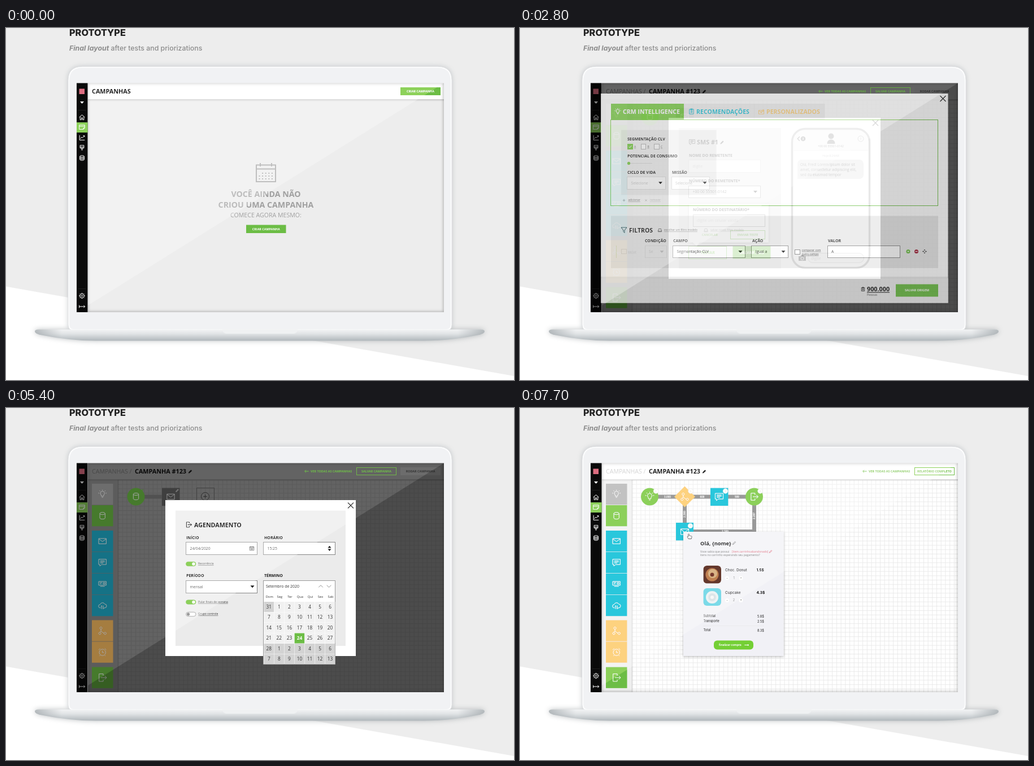
Recreate the animation shown at these times as an HTML page. Size 899 px wide and 623 px high, loop 8000 ms.

```html
<!DOCTYPE html>
<html lang="pt">
<head>
<meta charset="utf-8">
<title>Prototype</title>
<style>
  html, body { margin: 0; width: 100%; height: 100%; overflow: hidden; background: #ededed; }
  svg { display: block; width: 899px; height: 623px; font-family: "Open Sans", "Noto Sans", sans-serif; }
  .head { font-family: Inter, sans-serif; }
  .b { font-weight: 700; }
  .m { text-anchor: middle; }
  .u { text-decoration: underline; }
  .shine { mix-blend-mode: overlay; }
</style>
</head>
<body>
<svg id="stage" viewBox="0 0 899 623" xmlns="http://www.w3.org/2000/svg"></svg>
<script>
const GREEN = '#6cbd45', CYAN = '#1fb0cd', YELLOW = '#fdbf62', GREY = '#a8a8a8';
const PHONE = '+00 00 55501-0142';

const gearTeeth = Array.from({ length: 8 }, (_, i) => {
  const c = Math.cos(i * Math.PI / 4), s = Math.sin(i * Math.PI / 4);
  return `M${12 + 8 * c} ${12 + 8 * s}L${12 + 11 * c} ${12 + 11 * s}`;
}).join('');

// Line icons on a 24 x 24 grid
const ICONS = {
  home: 'M2 12 12 3 22 12M5 10V21H10V14H14V21H19V10',
  plan: 'M2 4H22V15L17 20H2ZM2 9H22M17 20V15H22',
  chart: 'M3 3V21H22M6 16 11 10 14 13 21 5M16 5H21V10',
  brush: 'M5 3H19V13H5ZM5 9H19M10 13V19Q12 24 14 19V13',
  db: 'M5 6Q5 3 12 3T19 6V18Q19 21 12 21T5 18ZM5 6Q5 9 12 9T19 6',
  stack: 'M4 6Q4 3 12 3T20 6V18Q20 21 12 21T4 18ZM4 6Q4 9 12 9T20 6M4 10Q4 13 12 13T20 10M4 14Q4 17 12 17T20 14',
  gear: 'M12 4a8 8 0 1 0 .01 0ZM12 9a3 3 0 1 0 .01 0Z' + gearTeeth,
  out: 'M2 7V17M2 12H23M18 8 23 12 18 16',
  bulb: 'M9 17H15M10 20H14M9 17Q9 14 7.5 12.5A5.5 5.5 0 1 1 16.5 12.5Q15 14 15 17M12 0V2M1 9H3.5M20.5 9H23M4 2 6 4M20 2 18 4',
  mail: 'M2 5H22V19H2ZM2 6 12 13 22 6',
  chat: 'M2 3H22V17H10L5 21V17H2ZM6 7H18M6 10H18M6 13H14',
  push: 'M2 5H22V15H2ZM5 8H11M5 11H9M14 8H19V12H14ZM6 18H18',
  cloud: 'M8 18H6A4.5 4.5 0 0 1 6 9A6.5 6.5 0 0 1 18 8A5 5 0 0 1 18 18H16M10 21V12L7.5 14.5M14 12V21L16.5 18.5',
  branch: 'M8 2a3 3 0 1 0 .01 0ZM5 16a3 3 0 1 0 .01 0ZM19 16a3 3 0 1 0 .01 0ZM8 8V13L5 16M8 13 16 19',
  alarm: 'M12 4a8.5 8.5 0 1 0 .01 0ZM12 8V13H16M2 6 6 2M22 6 18 2M6 20 4 22M18 20 20 22',
  exit: 'M14 7V2H3V22H14V17M8 12H23M18 7 23 12 18 17',
  pencil: 'M3 21 5 15 17 3 21 7 9 19Z',
  cal: 'M2 4H22V21H2ZM2 9H22M7 2V6M17 2V6M6 13H18M6 17H18',
  funnel: 'M2 3H22L14 13V22L10 18V13Z',
  tray: 'M3 15 6 4H18L21 15V20H3ZM3 15H8L10 17H14L16 15H21',
  list: 'M4 3H20V21H4ZM8 7H16M8 11H16M8 15H16M9 1H15V4H9Z',
  back: 'M23 12H2M9 5 2 12 9 19',
  arrow: 'M1 12H23M18 8 23 12 18 16',
  close: 'M2 2 22 22M22 2 2 22',
  plus: 'M12 3V21M3 12H21',
  check: 'M4 12 10 18 20 6',
  up: 'M2 17 12 7 22 17',
  down: 'M2 7 12 17 22 7',
  left: 'M17 2 7 12 17 22',
  move: 'M12 2V9M12 15V22M2 12H9M15 12H22M9 5 12 2 15 5M9 19 12 22 15 19M5 9 2 12 5 15M19 9 22 12 19 15',
  hand: 'M8 22 3 14Q4 11 7 14V4Q9 1 10.5 4V10Q13 8 14 10.5 17 9 18 11.5 21 10.5 21 14L19 22Z'
};

const icon = (name, cx, cy, size, color = '#fff', weight = 1, fill = 'none') =>
  `<path d="${ICONS[name]}" transform="translate(${cx - size / 2} ${cy - size / 2}) scale(${size / 24})" fill="${fill}" stroke="${color}" stroke-width="${weight * 24 / size}"/>`;
const rect = (x, y, x2, y2, fill, extra = '') =>
  `<rect x="${x}" y="${y}" width="${x2 - x}" height="${y2 - y}" fill="${fill}" ${extra}/>`;
// Outlined box, snapped to whole pixels
const frame = (x, y, x2, y2, stroke, fill = 'none', extra = '') =>
  rect(Math.floor(x) + .5, Math.floor(y) + .5, Math.ceil(x2) - .5, Math.ceil(y2) - .5, fill, `stroke="${stroke}" ${extra}`);
const disc = (cx, cy, r, fill, extra = '') => `<circle cx="${cx}" cy="${cy}" r="${r}" fill="${fill}" ${extra}/>`;
const path = (d, fill, extra = '') => `<path d="${d}" fill="${fill}" ${extra}/>`;
// y is the middle of the capitals
const text = (x, y, str, size = 7, fill = '#222', cls = '', extra = '') =>
  `<text x="${x}" y="${y + size * .357}" font-size="${size}" fill="${fill}" class="${cls}" ${extra}>${str}</text>`;
const label = (x, y, str) => text(x, y, str, 7, '#1c1c1c', 'b');
const caret = (x, y, color = '#111') => path(`M${x - 3.5} ${y - 2}h7l-3.5 4z`, color);
const button = (x, y, x2, y2, str, size = 5.4) =>
  rect(x, y, x2, y2, GREEN) + text((x + x2) / 2, (y + y2) / 2, str, size, '#fff', 'b m');
const outline = (x, y, x2, y2, str, size = 5.4) =>
  frame(x, y, x2, y2, GREEN) + text((x + x2) / 2, (y + y2) / 2, str, size, GREEN, 'b m');
const field = (x, y, x2, y2, str, { faint, select, line = faint ? '#cfcfcf' : '#858585', bg = '#fff' } = {}) =>
  frame(x, y, x2, y2, line, bg) + text(x + 7, (y + y2) / 2, str, 6.8, faint ? '#b4b4b4' : '#333') +
  (select ? caret(x2 - 9, (y + y2) / 2, select) : '');
const dimmed = (level, body) => `<g style="filter:brightness(${level})">${body}</g>`;

function sidebar(level) {
  const entries = [['home', 158], ['plan', 175.5], ['chart', 194], ['brush', 212], ['stack', 230], ['gear', 474], ['out', 493]];
  return dimmed(level, rect(125, 97.5, 144.5, 503, '#0a0a0a') + rect(125, 167, 144.5, 185, '#8bd05a') +
    rect(129.5, 107.5, 139, 117, '#dc6d80') + caret(134.5, 132, '#fff') +
    rect(128, 145, 141, 145.5, '#333') + rect(128, 461, 141, 461.5, '#333') +
    entries.map(([name, y]) => icon(name, 134.5, y, 11.5)).join(''));
}

const edges = `<g clip-path="url(#work)"><rect x="143" y="96" width="633" height="408" fill="none" stroke="#000" stroke-opacity=".3" stroke-width="4" filter="url(#soft)"/></g>`;
const headerBar = rect(145, 98, 775, 130, 'url(#drop)') + rect(145, 97.5, 775, 126, '#fff');

function emptyScene() {
  let dots = '';
  for (let n = 1; n < 15; n++) {
    const x = 447.5 + n % 5 * 5.6, y = 256 + Math.floor(n / 5) * 5;
    dots += rect(x, y, x + 2, y + 2, '#a3a3a3');
  }
  return rect(145, 98, 775, 503, '#ededed') + headerBar + edges +
    text(152, 112.5, 'CAMPANHAS', 10.8, '#111', 'b') + button(698, 105, 769, 119, 'CRIAR CAMPANHA') +
    path('M443 242.5H477V272H443ZM443 249.5H477M450 239V245M470 239V245', 'none', 'stroke="#a3a3a3" stroke-width="2"') + dots +
    text(460, 294, 'VOCÊ AINDA NÃO', 14.2, '#a0a0a0', 'b m') +
    text(460, 312.5, 'CRIOU UMA CAMPANHA', 14.2, '#a0a0a0', 'b m') +
    text(460, 331.5, 'COMECE AGORA MESMO:', 10.6, '#a0a0a0', 'm') +
    button(425, 348.5, 495.5, 363, 'CRIAR CAMPANHA') + sidebar(1);
}

const TILES = [
  ['bulb', 134, GREY], ['db', 172, GREEN], ['mail', 217, CYAN], ['chat', 255, CYAN], ['push', 293, CYAN],
  ['cloud', 331, CYAN], ['branch', 375.5, YELLOW], ['alarm', 413.5, YELLOW], ['exit', 458.5, GREEN]
];

function board({ level = 1, body = '' }) {
  const dark = level < 1;
  const shift = dark ? -78 : 0;
  const tiles = TILES.map(([name, y, color]) =>
    rect(152, y, 189.5, y + 37.3, color) + icon(name, 170.7, y + 18.7, 16)).join('');
  const actions = icon('back', 610 + shift, 112, 8, GREEN) +
    text(617 + shift, 112, 'VER TODAS AS CAMPANHAS', 5.4, GREEN, 'b') +
    (dark ? outline(620, 105, 691, 119, 'SALVAR CAMPANHA') +
        rect(698, 105, 769, 119, '#686868') + text(733.5, 112, 'RODAR CAMPANHA', 5.4, '#333', 'b m')
      : outline(698, 105, 769, 119, 'RELATÓRIO COMPLETO'));
  return rect(145, 98, 775, 503, '#fff') + rect(198, 127, 775, 503, 'url(#grid)') +
    rect(145, 127, 197, 503, '#efefef') + rect(197, 127, 201, 503, 'url(#side)') + headerBar + edges +
    (dark ? rect(145, 97.5, 775, 503, '#000', 'opacity=".7"') : '') +
    dimmed(dark ? level + .3 : 1, actions) +
    dimmed(level, tiles + text(152, 112.5, 'CAMPANHAS /', 10.6, dark ? '#707070' : '#c4c4c4') +
      text(228, 112.5, 'CAMPANHA #123', 10.8, '#0c0c0c', 'b') + icon('pencil', 326, 112.5, 7, '#111', 1, '#111') + body) +
    sidebar(dark ? level + .1 : 1);
}

function segmentScene() {
  const box = (x, y, color = '#999', fill = '#fff') => frame(x, y, x + 9, y + 9, color, fill);
  const segments = ['A', 'B', 'C'].map((name, i) =>
    box(190.5 + 23.5 * i, 205.5, i ? '#999' : GREEN, i ? '#fff' : GREEN) + text(202 + 23.5 * i, 210, name, 5, '#444', 'u')).join('');
  return board({ level: .4 }) + rect(143, 116, 757.5, 486.5, '#fff') + icon('close', 748.5, 125, 12, '#222', 1.2) +
    rect(161, 134, 290, 163, GREEN) + rect(290, 134, 539.5, 163, '#ededed') + rect(414, 134, 414.5, 163, '#ddd') +
    icon('bulb', 173, 148, 12) + text(182, 148.5, 'CRM INTELLIGENCE', 10.6, '#fff', 'b') +
    icon('list', 303.5, 148, 11, CYAN) + text(312, 148.5, 'RECOMENDAÇÕES', 10.6, CYAN, 'b') +
    icon('mail', 427, 149, 11, YELLOW) + icon('pencil', 429, 147, 8, YELLOW) + text(436, 148.5, 'PERSONALIZADOS', 10.6, YELLOW, 'b') +
    frame(160.5, 162.5, 740, 314.5, GREEN, '#fff') + rect(179, 180.5, 347.5, 295.5, '#ededed') +
    label(190, 197, 'SEGMENTAÇÃO CLV') + segments + icon('check', 195, 210, 7) +
    label(190, 226.5, 'POTENCIAL DE CONSUMO') + rect(193, 239, 234, 239.7, '#bbb') + disc(192.5, 239.5, 2.7, GREEN) +
    label(190, 255.5, 'CICLO DE VIDA') + label(269, 255.5, 'MISSÃO') +
    field(189.5, 263, 257.5, 285.5, 'Selecione', { faint: true, select: '#111' }) +
    field(268, 263, 336, 285.5, 'Selecione', { faint: true, select: '#111' }) +
    icon('plus', 184, 305, 6, '#777', .8) + text(191.5, 304.5, 'adicionar', 4.9, '#444', 'u') +
    icon('close', 223, 305, 4, '#aaa', .8) + text(230, 304.5, 'remover', 4.9, '#b5b5b5', 'u') +
    rect(161, 332.5, 740, 425, '#e8e8e8') + icon('funnel', 184, 357.5, 12, '#222') + text(193, 358, 'FILTROS', 10.5, '#1c1c1c', 'b') +
    icon('tray', 247.5, 358, 8, '#444', .9) + text(255, 357.5, 'escolher um filtro modelo', 4.9, '#444', 'u') +
    icon('tray', 329, 358, 8, '#bbb', .9) + text(337, 357, 'salvar nosso filtro modelo', 4.9, '#b5b5b5', 'u') +
    label(221, 377, 'CONDIÇÃO') + label(271, 377, 'CAMPO') + label(411, 377, 'AÇÃO') + label(545, 377, 'VALOR') +
    rect(170, 385, 171, 407, '#c5d6a8') + box(179.5, 391, '#c8c8c8', 'none') + text(191, 396, 'excluir', 4.9, '#bbb', 'u') +
    field(221, 385, 260, 407, 'Se', { faint: true, select: '#aaa', bg: 'none' }) +
    field(270.5, 385, 399, 407, 'Segmentação CLV', { select: '#111' }) + field(409.5, 385, 475, 407, 'Igual a', { select: '#111' }) +
    box(486.5, 392, '#777') + text(498.5, 393, 'comparar com', 5, '#333', 'u') + text(498.5, 400, 'outro campo', 5, '#333', 'u') +
    field(544, 385, 673, 407, 'A') + disc(687, 395.5, 3.5, GREEN) + icon('plus', 687, 395.5, 4, '#fff', .8) +
    disc(701.5, 395.5, 3.5, '#a3263c') + rect(699.5, 395, 703.5, 396, '#fff') + icon('move', 716, 395.5, 8, '#333', .9) +
    rect(143, 439, 757.5, 443, 'url(#rise)') + rect(143, 442.5, 757.5, 486.5, '#ededed') +
    icon('list', 607, 462.5, 8, '#333', .9) + text(614, 462.5, '900.000', 10.8, '#1c1c1c', 'b u') +
    text(614, 472, 'Pessoas', 4.9, '#555') + button(665, 453.5, 740, 475.5, 'SALVAR ORIGEM');
}

// Start of a campaign: one source, one message, one open slot
const draft = linked => (linked ? rect(245, 153.5, 276, 160.5, '#7c7c7c') : '') +
  disc(230, 157, 15.5, GREEN) + icon('db', 230, 156.5, 16) + icon('pencil', 241, 146, 6, GREEN) +
  rect(276, 141.5, 307.5, 173, '#606060') + icon('mail', 291.5, 157, 16, '#ddd') + icon('pencil', 303, 146, 6, '#ddd') +
  frame(337, 141, 369, 173, '#666') + disc(352.5, 156.5, 7, 'none', 'stroke="#444"') + icon('plus', 352.5, 156.5, 9, '#444');
const draftBoard = linked => board({ level: .5, body: draft(linked) });

function messageScene() {
  const bubble = ['Olá, Fred! Lorem ipsum dolor sit', 'amet, consectetur adipiscing elit,', 'sed do eiusmod tempor'];
  return draftBoard(false) + rect(263, 159, 638, 444, '#fff') + icon('close', 629, 168, 12, '#222', 1.2) +
    rect(281, 177, 462, 426, '#ebebeb') + icon('chat', 304.5, 202, 12, '#222') +
    text(313, 202.5, 'SMS #1', 10.8, '#1c1c1c', 'b') + icon('pencil', 357.5, 202.5, 7, '#222', 1, '#222') +
    label(299, 225.5, 'NOME DO REMETENTE') + field(298.5, 233.5, 425.5, 255.5, 'digite', { faint: true }) +
    label(299, 271, 'NÚMERO DO REMETENTE*') + field(298.5, 279, 425.5, 301, PHONE, { select: '#111' }) +
    `<g filter="url(#shadow)">${path('M299 311.5H440V379.5H318L312 385.5 306 379.5H299Z', '#fff')}</g>` +
    label(306, 322, 'NÚMERO DO DESTINATÁRIO*') + field(306, 330, 433.5, 351.5, 'digite um celular válido', { faint: true, line: '#999' }) +
    text(336, 366, 'CANCELAR', 5.4, GREEN, 'b m') + outline(372.5, 358.5, 433.5, 373.5, 'ENVIAR TESTE') +
    outline(298.5, 386, 366, 408.5, 'TESTAR', 7.2) + button(376.5, 386, 443.5, 408.5, 'SALVAR SMS', 7.2) +
    rect(481.5, 178.5, 618.5, 424.5, '#fff', 'rx="23" stroke="#a3a3a3" stroke-width="3.5"') +
    path('M484 216V203Q484 181 506 181H594Q616 181 616 203V216Z', '#f5f5f5') + rect(484, 216, 616, 216.7, '#d5d5d5') +
    icon('left', 493, 196, 9, '#444', 1.2) + disc(501, 196, 4.3, '#555') + text(501, 196, '3', 5, '#fff', 'b m') +
    disc(550.5, 191.5, 5, '#5f5f5f') + path('M543.5 205Q543.5 197.5 550.5 197.5T557.5 205Z', '#5f5f5f') +
    disc(603, 196, 5, 'none', 'stroke="#777" stroke-width=".8"') + text(603, 196, 'i', 6.5, '#666', 'm') +
    text(550, 209.5, PHONE, 5.2, '#333', 'm') + text(550, 226, 'Hoje 8:24AM', 5, '#999', 'm') +
    rect(491, 233, 608, 267, '#dedede', 'rx="7"') + path('M491 258V267H501Z', '#dedede') +
    bubble.map((line, i) => text(496, 241.5 + 9 * i, line, 6.5, '#555')).join('') +
    path('M493 404H496L497.5 402H501.5L503 404H506V412H493Z', '#555') + disc(499.5, 408, 2.5, '#555', 'stroke="#fff"') +
    frame(509.5, 398.5, 609, 416, '#c2c2c2', '#f7f7f7', 'rx="8.5"') + text(515, 407.5, 'digite', 6.8, '#b0b0b0');
}

function scheduleScene() {
  const toggle = (y, on, str) => rect(318.5, y - 3.7, 336, y + 3.7, on ? GREEN : '#fff', `rx="3.7" stroke="${on ? GREEN : '#777'}" stroke-width=".8"`) +
    disc(on ? 332 : 322.5, y, 2.7, on ? '#fff' : '#777') + text(340, y - .5, str, 5, '#333', 'u');
  const column = i => 465.3 + 18.05 * i;
  let days = ['Dom', 'Seg', 'Ter', 'Qua', 'Qui', 'Sex', 'Sab'].map((d, i) => text(column(i) + 1, 333.5, d, 5.8, '#333', 'm')).join('');
  for (let i = 0; i < 42; i++) {
    const x = column(i % 7), y = 352 + 18.5 * Math.floor(i / 7);
    const today = i === 24, outside = i === 0 || i > 27;
    days += rect(x - 8.8, y - 9, x + 8.8, y + 9, today ? GREEN : outside ? '#d3d3d3' : '#f1f1f1') +
      text(x, y, i === 0 ? 31 : i > 28 ? i - 28 : i, 8.3, today ? '#fff' : '#333', today ? 'b m' : 'm');
  }
  return draftBoard(true) + rect(282, 163, 619, 439, '#fff') + icon('close', 610, 172.5, 12, '#222', 1.2) +
    rect(300, 181.5, 601, 421, '#ebebeb') + icon('exit', 323.5, 206.5, 11, '#222') +
    text(333, 207.5, 'AGENDAMENTO', 10.7, '#1c1c1c', 'b') +
    label(319, 230, 'INÍCIO') + field(318.5, 237.5, 445, 259.5, '24/04/2020') + icon('cal', 435, 248.5, 9, '#444', .8) +
    label(457, 230, 'HORÁRIO') + field(455.5, 237.5, 582.5, 259.5, '15:25') +
    path('M569.5 247.5h6l-3-3.5zM569.5 249.5h6l-3 3.5z', '#111') +
    toggle(276, true, 'Recorrência') + label(319, 297, 'PERÍODO') + label(457, 297, 'TÉRMINO') +
    field(318.5, 305, 445, 327.5, 'mensal', { select: '#111' }) +
    toggle(343.5, true, 'Pular finais de semana') + toggle(365, false, 'Grupo controle') +
    frame(455.5, 305, 582.5, 454, '#999', '#fff') + text(460, 316, 'Setembro de 2020', 6.9, '#333') +
    icon('up', 557, 315.5, 9, '#777', .8) + icon('down', 571.5, 315.5, 9, '#777', .8) + days;
}

function flowScene() {
  const badge = (x, y) => disc(x, y, 4.3, '#fff', 'stroke="#ddd" stroke-width=".5"') + text(x, y, 'i', 4.5, '#aaa', 'm');
  const count = (x, y, n, turn = 0) => text(x, y, n, 4.6, '#fff', 'b m', `transform="rotate(${turn} ${x} ${y})"`);
  const product = (y, name, price, amount) => text(363, y, name, 6.5, '#222', 'head', 'font-weight="500"') +
    text(418.5, y, price, 6.6, '#111', 'head b') + disc(366.5, y + 14, 3.5, '#fff') + disc(391, y + 14, 3.5, '#fff') +
    text(366.5, y + 14, '−', 5.5, '#444', 'm') + text(378.5, y + 14, amount, 5.5, '#666', 'head m') + text(391, y + 14, '+', 5.5, '#444', 'm');
  const total = (y, name, price) => text(324.5, y, name, 5.5, '#222', 'head') + text(432, y, price, 5.7, '#222', 'head', 'text-anchor="end"');
  const bars = rect(244, 153.5, 402, 160.5, '#777') + rect(288, 172, 295, 205, '#777') +
    rect(411, 170, 418, 219, '#777') + rect(306, 215, 418, 222, '#777') +
    count(261, 157, '3.000') + count(322.5, 157, '600') + count(384, 157, '599') +
    count(291.5, 188, '2.300', -90) + count(414.5, 191, '2.297', -90) + count(363, 218.5, '2.300');
  const nodes = disc(229.5, 157, 15.5, GREEN) + icon('bulb', 229.5, 157, 17) +
    path('M291.5 138.5 310 157 291.5 175.5 273 157Z', YELLOW) + icon('branch', 291.5, 157, 16) +
    rect(337, 141.5, 368.5, 173, CYAN) + icon('chat', 352.5, 157.5, 17) +
    disc(414.5, 157, 15.5, GREEN) + icon('exit', 414.5, 157, 15) +
    rect(276, 203, 307, 234.5, CYAN) + icon('mail', 291.5, 219, 17) +
    [240.5, 302, 363.5, 425].map(x => badge(x, 147)).join('') + badge(301.5, 208.5);
  const card = `<g filter="url(#shadow)">${rect(289, 219, 466.5, 439, '#f1f1f6')}</g>` +
    text(319, 239.5, 'Olá, {nome}', 9.3, '#1c1c1c', 'b') + icon('pencil', 379, 239, 7, '#444', .7) +
    text(319, 254, 'Voce sabia que possui', 5, '#555') + text(375, 254, '[item.carrinhoabandonado]', 5, '#d8485c') +
    icon('pencil', 443.5, 254, 6, '#d8485c', .8) + text(319, 260.5, 'itens no carrinho esperando seu pagamento?', 5, '#555') +
    rect(324.5, 279, 356, 310.5, '#4d2b22', 'rx="6"') + disc(340, 295, 11.5, '#a5633f') + disc(341, 293, 8, '#c99468') + disc(340, 295, 3.5, '#5b2c23') +
    rect(324.5, 319, 356, 350, '#5fcbdf', 'rx="6"') + disc(340, 335, 11, '#e8eef0') + disc(340, 335, 7, '#d0dbdf') + disc(340, 335, 3, '#f6f6f6') +
    product(287, 'Choc. Donut', '1.5$', 1) + product(326.5, 'Cupcake', '4.3$', 2) +
    total(368.5, 'Subtotal', '5.8$') + total(377.5, 'Transporte', '2.5$') + rect(324.5, 385, 432, 385.4, '#ddd') + total(393.5, 'Total', '8.3$') +
    rect(343, 411.5, 413, 427.5, '#74cf35', 'rx="6"') + text(352, 419.5, 'finalizar compra', 5, '#fff', 'head b') + icon('arrow', 401, 419.5, 8);
  return board({ body: bars + nodes + card + icon('hand', 300, 227, 11, '#222', .8, '#fff') });
}

const defs = `<defs>
  <linearGradient id="base" x2="0" y2="1"><stop stop-color="#f3f4f5"/><stop offset=".4" stop-color="#e0e3e5"/><stop offset="1" stop-color="#b0b7bb"/></linearGradient>
  <linearGradient id="tips"><stop stop-color="#7c858a" stop-opacity=".5"/><stop offset=".06" stop-color="#7c858a" stop-opacity="0"/><stop offset=".94" stop-color="#7c858a" stop-opacity="0"/><stop offset="1" stop-color="#7c858a" stop-opacity=".5"/></linearGradient>
  <linearGradient id="drop" x2="0" y2="1"><stop offset=".85" stop-opacity=".2"/><stop offset="1" stop-opacity="0"/></linearGradient>
  <linearGradient id="side"><stop stop-opacity=".12"/><stop offset="1" stop-opacity="0"/></linearGradient>
  <linearGradient id="rise" x2="0" y2="1"><stop stop-opacity="0"/><stop offset="1" stop-opacity=".15"/></linearGradient>
  <pattern id="grid" x="198" y="127" width="7.7" height="7.7" patternUnits="userSpaceOnUse"><path d="M0 .5H7.7M.5 0V7.7" stroke="#e6e6e6" stroke-width=".8"/></pattern>
  <filter id="soft" x="-10%" y="-10%" width="120%" height="120%"><feGaussianBlur stdDeviation="2.5"/></filter>
  <filter id="haze" x="-10%" y="-60%" width="120%" height="220%"><feGaussianBlur stdDeviation="5"/></filter>
  <filter id="shadow" x="-10%" y="-10%" width="120%" height="125%"><feDropShadow dx="0" dy="1" stdDeviation="2" flood-opacity=".3"/></filter>
  <clipPath id="work"><path d="M145 97.5H775V503H145Z"/></clipPath>
</defs>`;

const lid = 'M110 92Q110 68.5 134 68.5H765Q789 68.5 789 92V526Q789 535 780 535H119Q110 535 110 526Z';
const foot = 'M51 537Q51 533.5 58 533.5H840Q847 533.5 847 537 847 541 835 543.5 785 553.5 740 553.5H158Q113 553.5 63 543.5 51 541 51 537Z';
const backdrop = rect(0, 0, 899, 623, '#ededed') + path('M0 457.5 899 616V623H0Z', '#fff') +
  text(112, 8.5, 'PROTOTYPE', 16.3, '#222', 'head', 'font-weight="800"') +
  text(112, 35.5, '<tspan font-weight="700" font-style="italic">Final layout</tspan> after tests and priorizations', 12.35, '#8c8c8c', 'head', 'font-weight="500"') +
  path(lid, '#8b9299', 'opacity=".45" filter="url(#haze)"') + path(foot, '#7d8488', 'opacity=".5" filter="url(#haze)"') +
  path(lid, '#f1f2f4', 'stroke="#dfe1e3"') + path(lid, 'none', 'stroke="#fff" stroke-width="1.5" transform="translate(1.8 1.2) scale(.996)"') +
  path(foot, 'url(#base)') + path(foot, 'url(#tips)') +
  path('M383 533.5H516Q515 541 509 541H390Q384 541 383 533.5Z', '#eff1f2');

const scenes = [emptyScene, segmentScene, messageScene, scheduleScene, flowScene];
const stage = document.getElementById('stage');
stage.innerHTML = defs + backdrop + scenes.map(draw => `<g class="scene">${draw()}</g>`).join('') +
  path('M145 97.5H775L145 491Z', '#fff', 'class="shine" opacity=".3"');

const LOOP = 8000, STEP = 100, STEPS = 4;
const starts = [-STEP * STEPS, 500, 2800, 5100, 7400];
const layers = [...document.querySelectorAll('.scene')];

function render() {
  const time = performance.now() % LOOP;
  const alphas = starts.map(s => Math.max(0, Math.min(1, (Math.floor((time - s) / STEP) + 1) / STEPS)));
  const bottom = alphas.lastIndexOf(1);
  layers.forEach((layer, i) => {
    layer.style.display = i < bottom || !alphas[i] ? 'none' : '';
    layer.style.opacity = alphas[i];
  });
  requestAnimationFrame(render);
}
render();
</script>
</body>
</html>
```
